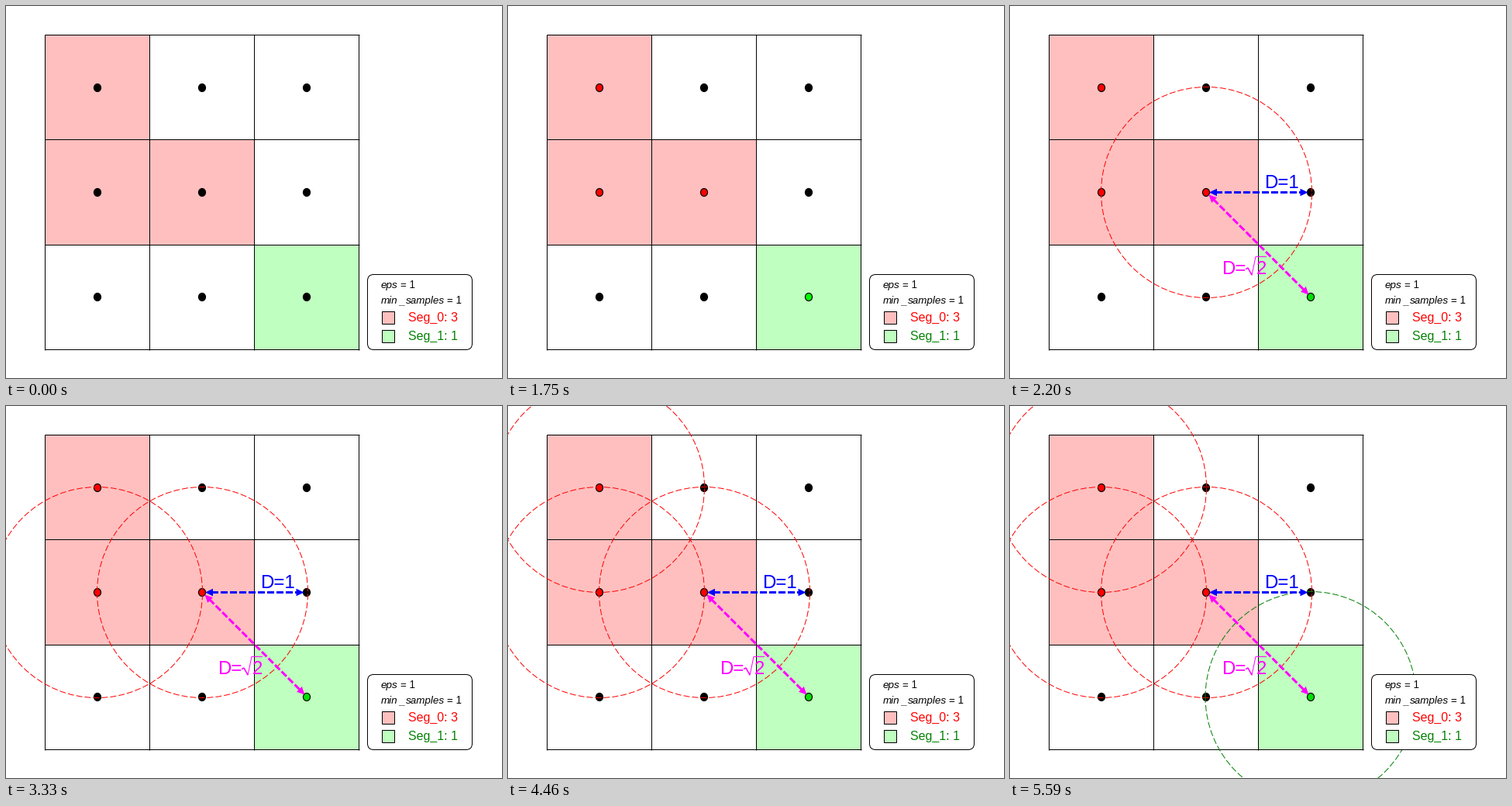
These frames come from a looping animation (640 px wide and 480 px high, 6720 ms). A matplotlib script:

```python
import matplotlib.pyplot as plt
from matplotlib.animation import FuncAnimation
from matplotlib.patches import Ellipse, FancyBboxPatch, Polygon, Rectangle
import numpy as np

W, H, DPI = 640, 480, 100
PX = 72 / DPI  # points per pixel
LOOP, TICK = 6720, 20
STARTS = [1070, 2200, 3330, 4460, 5590]

PINK, MINT = "#ffbfbf", "#bfffbf"
RED, GREEN, BLUE, MAGENTA = "#ff0000", "#008000", "#0000ff", "#ff00ff"
COLS, ROWS = [118, 253, 388], [105.5, 240.5, 375.5]
XS, YS = [50, 185, 320, 455], [37, 172, 308, 443]
SEGMENTS = {(0, 0): 0, (0, 1): 0, (1, 1): 0, (2, 2): 1}

plt.rcParams["text.hinting"] = "native"
fig = plt.figure(figsize=(W / DPI, H / DPI), dpi=DPI, facecolor="white")
ax = fig.add_axes([0, 0, 1, 1])
ax.set_xlim(0, W)
ax.set_ylim(H, 0)
ax.axis("off")


# Straight edges at whole coordinates snap to the centre of that pixel.
def box(x, y, w, h, fill, edge="none", z=1):
    ax.add_patch(Rectangle((x, y), w, h, fc=fill, ec=edge, lw=PX, zorder=z))


def label(x, y, text, size, color="black", style="normal", z=8):
    return ax.text(x, y, text, size=size * PX, color=color, style=style,
                   family="Liberation Sans", va="baseline", zorder=z)


def line(xs, ys, color, width=1, z=2, **kw):
    return ax.plot(xs, ys, color=color, lw=width * PX, zorder=z,
                   solid_capstyle="butt", **kw)[0]


def ring(x, y, color):
    return ax.add_patch(Ellipse((x, y), 272, 272, angle=-90, fc="none",
                                ec=color, lw=PX, ls=(0, (8, 3)), zorder=4.5))


def arrow(start, end, color, head=10, half=4.8):
    a, b = np.array(start), np.array(end)
    u = (b - a) / np.hypot(*(b - a))
    n = np.array([-u[1], u[0]]) * half
    parts = [line(*zip(a + u * (head - 2), b - u * (head - 2)), color, 3, 5,
                  ls=(0, (3, 1)), snap=False)]
    for tip, d in ((a, u), (b, -u)):
        base = tip + d * head
        parts.append(ax.add_patch(Polygon([tip, base + n, base - n],
                                          fc=color, ec="none", zorder=5)))
    return parts


# Grid cells, lines and centre dots
for (c, r), seg in SEGMENTS.items():
    box(XS[c], YS[r], XS[c + 1] - XS[c], YS[r + 1] - YS[r], (PINK, MINT)[seg])
for x in XS:
    line([x, x], [YS[0], YS[-1] + 1], "black")
for y in YS:
    line([XS[0], XS[-1] + 1], [y, y], "black")
dots = {}
for c, x in enumerate(COLS):
    for r, y in enumerate(ROWS):
        dots[c, r] = ax.add_patch(Ellipse((x, y), 9, 10, fc="black",
                                          ec="black", lw=1.2 * PX, zorder=4))

# Legend
ax.add_patch(FancyBboxPatch((466.5, 346.5), 135, 97, fc="white", ec="black",
                            boxstyle="round,pad=0,rounding_size=8",
                            lw=PX, zorder=6))
label(484, 364, "eps", 13.33, style="italic")
label(509, 364, "= 1", 13.33)
for x, word in ((484, "min"), (507, "_"), (516, "samples")):
    label(x, 384, word, 13.33, style="italic")
label(569, 384, "= 1", 13.33)
for y, fill, color, text in ((394, PINK, RED, "Seg_0: 3"),
                             (418, MINT, GREEN, "Seg_1: 1")):
    box(485, y, 16, 16, fill, "black", 7)
    label(519, y + 13, text, 16, color)

# Distances
measures = [
    *arrow((257, 240.5), (384.5, 240.5), BLUE),
    *arrow((256.5, 243.5), (385.5, 372.5), MAGENTA),
    label(328, 235, "D=1", 24, BLUE),
    label(273, 346, "D=", 24, MAGENTA),
    label(318, 346, "2", 24, MAGENTA),
    line([304, 307, 312], [339.5, 338, 347], MAGENTA, 1.6, 8),
    line([312, 317, 331], [347.5, 323.5, 323.5], MAGENTA, 1, 8),
]

# Neighbourhood rings, in order of appearance
rings = [ring(253.5, 240.5, RED), ring(117.5, 240.5, RED),
         ring(117.5, 104.5, RED), ring(388, 375.5, GREEN)]


def update(frame):
    step = sum(frame >= s // TICK for s in STARTS)
    lime = "#00ff00" if step == 1 else "#00e000"
    for cell, seg in SEGMENTS.items():
        dots[cell].set_facecolor((RED, lime)[seg] if step else "black")
    for part in measures:
        part.set_visible(step >= 2)
    for i, circle in enumerate(rings):
        circle.set_visible(step >= i + 2)
    return [*dots.values(), *measures, *rings]


anim = FuncAnimation(fig, update, frames=LOOP // TICK, interval=TICK,
                     init_func=lambda: update(0), repeat=True, repeat_delay=0)
plt.show()
```
